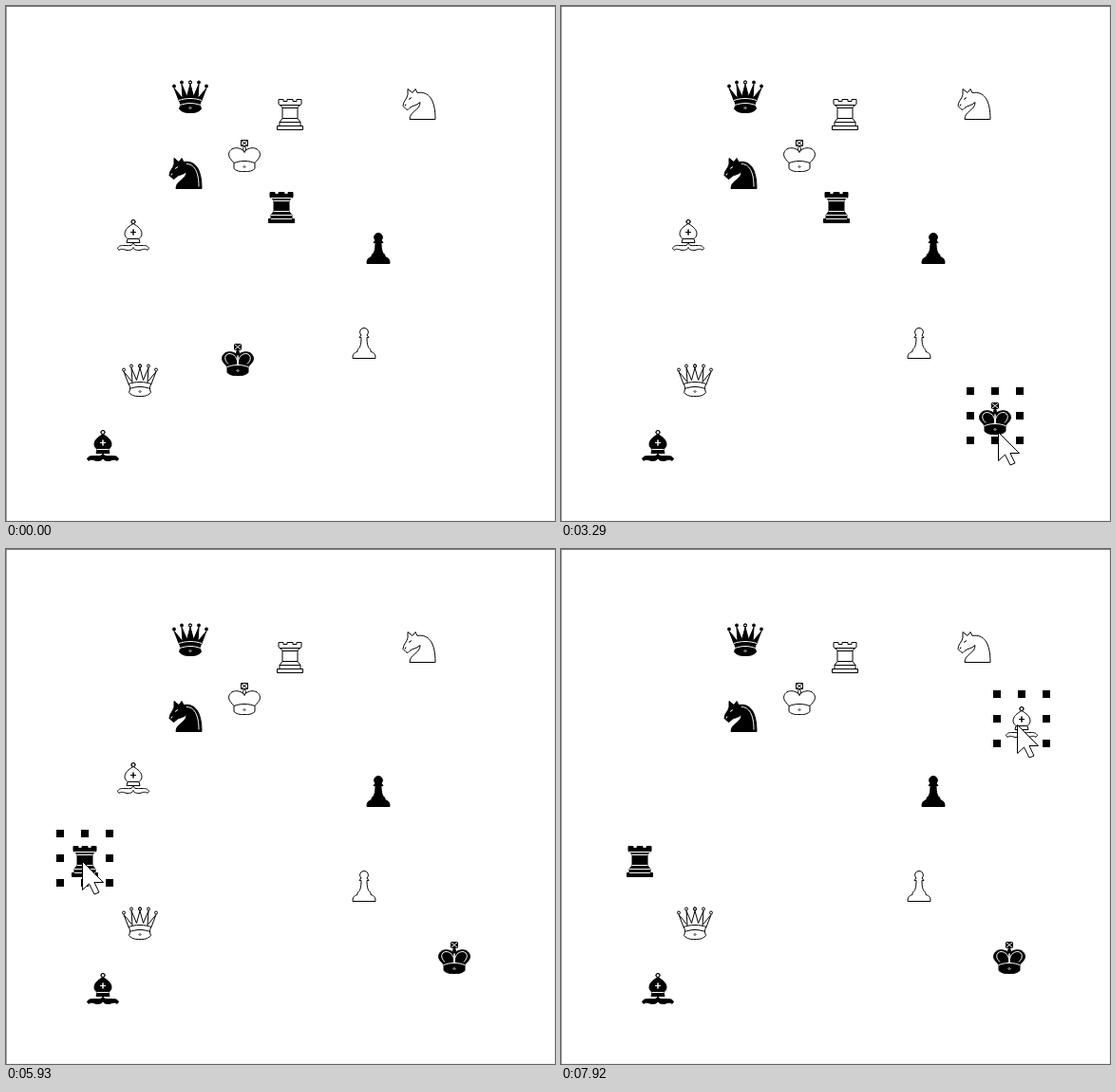
An HTML page with a canvas for the animation above (8000 ms loop, 578 by 543 pixels).

```html
<!DOCTYPE html>
<html lang="en">
<head>
<meta charset="utf-8">
<title>Dragging chess pieces</title>
<style>
  html, body { margin: 0; width: 100%; height: 100%; overflow: hidden; background: #fff; }
  canvas { display: block; }
</style>
</head>
<body>
<canvas id="stage" width="578" height="543"></canvas>
<script>
const W = 578, H = 543, LOOP = 8000, STEP = 76.6;
const ctx = document.getElementById('stage').getContext('2d');

// Joins a right half with its mirror image about x = 0
function mirrored(half) {
  const path = new Path2D(half);
  path.addPath(new Path2D(half), new DOMMatrix([-1, 0, 0, 1, 0, 0]));
  return path;
}

const ball = (x, y, r) => `M${x - r} ${y}a${r} ${r} 0 1 1 ${2 * r} 0a${r} ${r} 0 1 1 ${-2 * r} 0`;
const gem = 'M0 -6L1 -5L0 -4';

// Shapes stand on y = 0; shine is drawn on black pieces only
const shapes = {
  king: {
    body: mirrored('M0 -33H3.5V-27H0M0 -21C4 -26 15.5 -27 16.5 -18C16.5 -14 13 -12 11 -9V-3C7 .5 3 0 0 0M0 -27C2 -25 2 -23 0 -20'),
    lines: mirrored(`M0 -30L3.5 -33M0 -30L3.5 -27M0 -11C5 -11 8 -10 11 -9${gem}`),
    shine: mirrored('M0 -11C0 -19 4 -23 9 -23C14 -22 15 -17 10 -12M0 -21V-11')
  },
  queen: {
    body: mirrored(`${ball(0, -32, 1.5)}${ball(9, -32, 1.5)}${ball(17, -28, 1.5)}` +
      'M0 -30L3.5 -17L9 -30L8 -15L17 -26L12 -13C10 -10 10 -8 11.5 -4C8 0 4 0 0 0'),
    lines: mirrored(`M0 -15C5 -15 9 -14 12 -13M0 -10C4 -10 8 -9 11 -8${gem}`)
  },
  rook: {
    body: mirrored('M0 -32H3V-30H7V-32H12V-27L8 -24V-12L11 -8V-4H13.5V0H0'),
    lines: mirrored('M0 -26H11M0 -23H8M0 -12H8M0 -8H11M0 -4H11')
  },
  bishop: {
    body: mirrored(`${ball(0, -30, 2)}M0 -28C5 -25 9 -22 9 -17C9 -15 7 -13 6 -12L7 -8H0` +
      'M0 -8C1 -4 4 -5 9 -5C13 -5 15 -5 16.5 -2L15 0C13 -2 10 -1 7 0C4 0 1 0 0 -3'),
    lines: mirrored('M0 -22V-16M0 -19H3M0 -12H6')
  },
  knight: {
    body: new Path2D('M-10 0C-10 -9 1 -9 1 -18C-3 -14 -7 -15 -10 -12L-12 -10L-14 -11L-17 -14C-17 -19 -13 -21 -12 -26L-12 -32L-7 -28L-4 -32L-2 -28C10 -30 17 -21 17 0Z'),
    lines: new Path2D('M-11 -21L-8 -23M-15 -14L-14 -16'),
    shine: new Path2D('M1 -26C9 -26 14 -18 14 -2')
  },
  pawn: {
    body: mirrored('M0 -32A4.3 4.3 0 0 1 3 -24.5L5 -22H3C3 -15 4 -11 7 -9V-7C11 -6 12 -4 12 0H0'),
    lines: new Path2D()
  }
};

const piece = (side, kind, x, y) => ({ side, kind, x, y });
const idle = [
  piece('black', 'queen', 194, 93), piece('white', 'rook', 299, 111),
  piece('white', 'knight', 435, 100), piece('white', 'king', 251, 155),
  piece('black', 'knight', 189, 173), piece('black', 'pawn', 392, 252),
  piece('white', 'pawn', 377, 352), piece('white', 'queen', 141, 392),
  piece('black', 'bishop', 102, 460)
];

// Pointer trips: each leaves from where the last one ended; stops are time, x, y
const entry = [317, 545];
const trips = [
  { start: 670, stops: [[1440, 247, 387]] },
  { start: 2450, stops: [[2680, 326, 460], [2910, 380, 484], [3220, 448, 453], [3450, 475, 445]],
    clicked: 1820, carries: piece('black', 'king', 244, 370) },
  { start: 3830, stops: [[4600, 287, 212]] },
  { start: 5150, stops: [[5460, 139, 333], [5930, 80, 329]],
    clicked: 4920, carries: piece('black', 'rook', 290, 209) },
  { start: 6220, stops: [[6450, 126, 243], [6680, 129, 244]] },
  { start: 6927, stops: [[7620, 440, 206], [7920, 480, 185]],
    clicked: 6850, carries: piece('white', 'bishop', 134, 238) }
];
let origin = entry;
for (const trip of trips) {
  trip.keys = [[trip.start - STEP, ...origin], ...trip.stops];
  origin = trip.stops.at(-1).slice(1);
}
const drags = trips.filter(trip => trip.carries);

// Smooth curve through the keys, at rest at both ends
function sample(keys, t, axis) {
  const last = keys.length - 1;
  if (t >= keys[last][0]) return keys[last][axis];
  const i = Math.max(0, keys.findIndex(k => k[0] > t) - 1);
  const slope = n => n === 0 || n === last ? 0 :
    (keys[n + 1][axis] - keys[n - 1][axis]) / (keys[n + 1][0] - keys[n - 1][0]);
  const a = keys[i], b = keys[i + 1], d = b[0] - a[0], u = Math.max(0, (t - a[0]) / d);
  const ease = u * u * (3 - 2 * u);
  return a[axis] + (b[axis] - a[axis]) * ease +
    d * u * (1 - u) * ((1 - u) * slope(i) - u * slope(i + 1));
}

// Pointer tip on a trip, advancing in discrete steps
function tipOn(trip, t) {
  const steps = Math.floor((t - trip.start + 4) / STEP);
  return [1, 2].map(axis => Math.round(sample(trip.keys, trip.start + steps * STEP, axis)));
}

function drawPiece({ side, kind, x, y }) {
  const { body, lines, shine } = shapes[kind];
  const solid = side === 'black';
  ctx.save();
  ctx.translate(x, y + 19.5);
  ctx.lineWidth = 1;
  ctx.fillStyle = side;
  ctx.strokeStyle = '#000';
  ctx.fill(body);
  ctx.stroke(body);
  ctx.strokeStyle = solid ? '#fff' : '#000';
  ctx.stroke(lines);
  if (solid && shine) ctx.stroke(shine);
  ctx.restore();
}

function drawHandles({ x, y }) {
  ctx.fillStyle = '#000';
  for (const dx of [-26, 0, 26])
    for (const dy of [-26, 0, 26])
      if (dx || dy) ctx.fillRect(x + dx - 4, y + dy - 4, 8, 8);
}

const arrow = new Path2D('M0 0V30L7 23.5L12.5 34.5L17.5 32.5L12.5 22H22Z');

function drawPointer([x, y]) {
  ctx.save();
  ctx.translate(x + 0.5, y + 0.5);
  ctx.fillStyle = '#fff';
  ctx.fill(arrow);
  ctx.strokeStyle = '#000';
  ctx.stroke(arrow);
  ctx.restore();
}

function bar(color, x, y, w, h) {
  ctx.fillStyle = color;
  ctx.fillRect(x, y, w, h);
}

function draw(t) {
  bar('#f0f0f0', 0, 0, W, H);
  bar('#fff', 0, 0, W - 1, H - 1);
  bar('#a0a0a0', 0, 0, 1, H);
  bar('#808080', 0, 0, W, 1);

  idle.forEach(drawPiece);
  drags.forEach((drag, i) => {
    const moved = { ...drag.carries };
    if (t >= drag.start) {
      const [, grabX, grabY] = drag.keys[0];
      const [tipX, tipY] = tipOn(drag, t);
      moved.x += tipX - grabX;
      moved.y += tipY - grabY;
    }
    drawPiece(moved);
    const released = i + 1 < drags.length ? drags[i + 1].clicked : LOOP;
    if (t >= drag.clicked && t < released) drawHandles(moved);
  });

  const trip = trips.findLast(({ start }) => t >= start);
  if (trip) drawPointer(tipOn(trip, t));
}

const begin = performance.now();
function frame() {
  draw((performance.now() - begin) % LOOP);
  requestAnimationFrame(frame);
}
frame();
</script>
</body>
</html>
```
